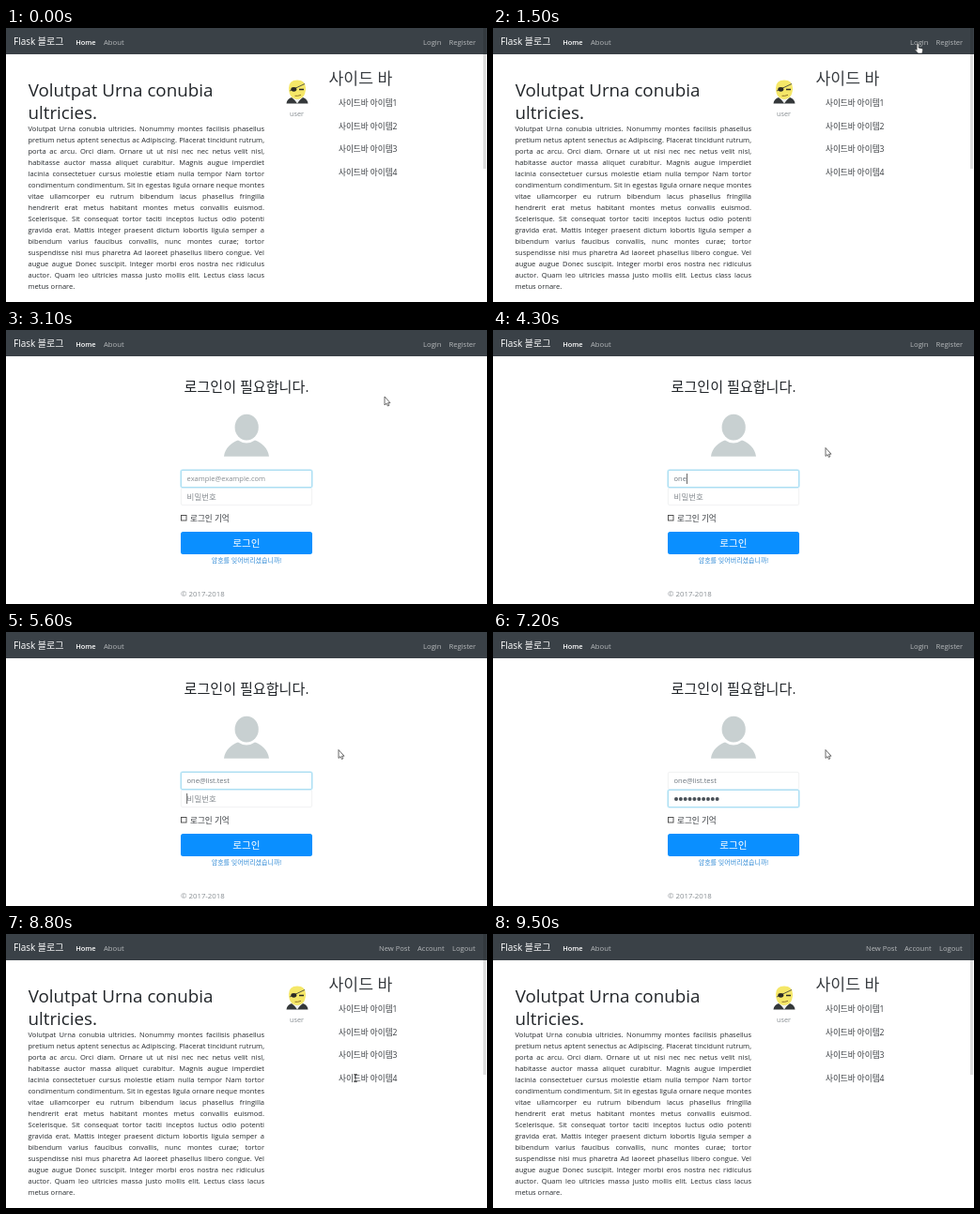
These frames come from a looping animation (512 by 292 pixels, 9.6 s). An HTML page:

```html
<!DOCTYPE html>
<html>
<head>
<meta charset="utf-8">
<title>Flask 블로그</title>
<style>
  html, body { margin: 0; width: 100%; height: 100%; overflow: hidden; background: #fff; }
  #stage { position: relative; width: 512px; height: 292px; overflow: hidden; }
  svg { position: absolute; left: 0; top: 0; }
  text, #post { font-family: "Open Sans", "Noto Sans CJK KR", "Noto Sans CJK", sans-serif; }
  text { white-space: pre; }
  #post { position: absolute; left: 23.5px; top: 101px; width: 251.5px;
          font-size: 7.55px; line-height: 12px; color: #25292d; }
  #post div { white-space: nowrap; text-align-last: justify; }
  #post div:last-child { text-align-last: left; }
</style>
</head>
<body>
<div id="stage">
  <svg width="512" height="292" viewBox="0 0 512 292">
    <rect width="512" height="28" fill="#3a4147"/>
    <g id="nav"></g>
    <g id="navGuest"></g>
    <g id="navUser"></g>

    <g id="home">
      <rect x="508" width="3" height="150" fill="#000" opacity=".13"/>
      <g id="avatar">
        <path d="M298.500 80.500Q299 75.500 304 74L310 79 316 74Q321 75.500 321.500 80.500Z" fill="#34383a"/>
        <path d="M305 73.500L310 80.500 315 73.500Z" fill="#eef0ee"/>
        <path d="M301 64Q301 55.500 310 55.500T319 64Q319 71 315.500 74Q310 78 304.500 74Q301 71 301 64Z" fill="#f5e768"/>
        <path d="M302 67L318 59.500" stroke="#34383a" stroke-width=".8"/>
        <ellipse cx="306.300" cy="65.300" rx="3" ry="2.400" fill="#2b2a25"/>
        <path d="M312 65.500H317" stroke="#2b2a25" stroke-width="1.500"/>
        <path d="M307.500 72.300Q310.500 72.800 314 71.300" fill="none" stroke="#7a5a1c" stroke-width=".8"/>
      </g>
    </g>

    <g id="login">
      <g fill="#c8d0d1">
        <ellipse cx="256.200" cy="103.700" rx="12.600" ry="13.900"/>
        <path d="M232 134.700C233 126 240 120 247 117.500Q256 123.500 265 117.500C272 120 279 126 280 134.700Z"/>
      </g>
      <g fill="#fff" stroke="#eceeef" stroke-width=".8">
        <rect x="186.400" y="149.400" width="139.200" height="18.200" rx="1.500"/>
        <rect x="186.400" y="168.400" width="139.200" height="18.200" rx="1.500"/>
      </g>
      <g id="mailGlow" fill="none">
        <rect x="186" y="149" width="140" height="19" rx="2" stroke="#d3f0fb" stroke-width="1.600"/>
        <rect x="186.400" y="149.400" width="139.200" height="18.200" rx="1.500" stroke="#9bd8f0" stroke-width=".8"/>
      </g>
      <g id="passGlow" fill="none">
        <rect x="186" y="168" width="140" height="19" rx="2" stroke="#d3f0fb" stroke-width="1.600"/>
        <rect x="186.400" y="168.400" width="139.200" height="18.200" rx="1.500" stroke="#9bd8f0" stroke-width=".8"/>
      </g>
      <rect x="186.500" y="197.500" width="5.500" height="5.500" fill="#fff" stroke="#444" stroke-width=".9"/>
      <rect x="186" y="215" width="140" height="24" rx="2.500" fill="#0a8fff"/>
      <g id="dots" fill="#495057"></g>
      <rect id="caret" width=".8" height="11" fill="#444"/>
    </g>
  </svg>
  <div id="post"></div>
  <svg width="512" height="292" viewBox="0 0 512 292">
    <g id="cursor">
      <path id="arrow" d="M0 0V9L2 7.200 3.400 10 4.800 9.400 3.500 6.700H6Z" fill="#fff" stroke="#444" stroke-width=".8"/>
      <path id="beam" d="M-.8-3H2.800M1-3V5M-.8 5H2.800" fill="none" stroke="#333" stroke-width=".8"/>
      <path id="hand" d="M-.8 7V1A.9.9 0 0 1 1 1V4.600L4.600 5.400Q5.600 5.700 5.400 7L4.800 10.500H.6L-2.600 7Q-2.400 5.600-.8 7Z" fill="#fff" stroke="#333" stroke-width=".5"/>
    </g>
  </svg>
</div>

<script>
const LOOP = 9600, STEP = 100;
const LOGIN_AT = 2200, TAB_AT = 5600, SUBMIT_AT = 7300;
const MAIL = "one@list.test", PASS_LENGTH = 10;
const LEFT = 192.6;

const el = id => document.getElementById(id);
const clamp = (v, lo, hi) => Math.min(hi, Math.max(lo, v));
const show = (id, on) => { el(id).style.display = on ? "" : "none"; };

function add(parent, tag, attrs) {
  const node = document.createElementNS("http://www.w3.org/2000/svg", tag);
  for (const key in attrs) node.setAttribute(key, attrs[key]);
  return el(parent).appendChild(node);
}

function label(parent, text, x, y, size, fill, weight = 400) {
  const node = add(parent, "text", { x, y, "font-size": size, "font-weight": weight, fill });
  node.textContent = text;
  return node;
}

const MUTED = "#b6b9bb", DARK = "#212529", SOFT = "#383c40", GRAY = "#868c91";

label("nav", "Flask 블로그", 8, 18, 10, "#fff");
label("nav", "Home", 74.2, 17.5, 7.4, "#fff", 600);
label("nav", "About", 104, 17.5, 7.7, MUTED);
label("navGuest", "Login", 444, 17.5, 7.7, MUTED);
label("navGuest", "Register", 471.5, 17.5, 7.6, MUTED);
label("navUser", "New Post", 397, 17.5, 7.6, MUTED);
label("navUser", "Account", 438, 17.5, 7.6, MUTED);
label("navUser", "Logout", 475, 17.5, 7.6, MUTED);

label("home", "Volutpat Urna conubia", 23.7, 73, 18.8, DARK);
label("home", "ultricies.", 23.5, 97, 18.8, DARK);
label("home", "user", 302, 94, 7.3, GRAY);
label("home", "사이드 바", 343.5, 60, 17.2, SOFT);
for (let i = 0; i < 4; i++)
  label("home", "사이드바 아이템" + (i + 1), 354, 83.2 + 24.5 * i, 8.6, SOFT, 500);

label("login", "로그인이 필요합니다.", 189.5, 65.6, 15.1, DARK);
const mailHint = label("login", "example@example.com", LEFT, 161.4, 7.5, GRAY);
const mailText = label("login", "", LEFT, 161.4, 7.5, "#6c757d");
const passHint = label("login", "비밀번호", LEFT, 180.8, 8.5, GRAY);
label("login", "로그인 기억", 196, 204, 8.6, SOFT, 500);
label("login", "로그인", 241.3, 231, 10.6, "#fff");
label("login", "암호를 잊어버리셨습니까!", 218.7, 248, 7, "#2f8ad6");
label("login", "© 2017-2018", 186, 284, 7.8, GRAY);

const dots = [];
for (let i = 0; i < PASS_LENGTH; i++)
  dots.push(add("dots", "circle", { cx: 195 + 4.85 * i, cy: 178, r: 2 }));

const POST = `Volutpat Urna conubia ultricies. Nonummy montes facilisis phasellus
pretium netus aptent senectus ac Adipiscing. Placerat tincidunt rutrum,
porta ac arcu. Orci diam. Ornare ut ut nisi nec nec netus velit nisl,
habitasse auctor massa aliquet curabitur. Magnis augue imperdiet
lacinia consectetuer cursus molestie etiam nulla tempor Nam tortor
condimentum condimentum. Sit in egestas ligula ornare neque montes
vitae ullamcorper eu rutrum bibendum lacus phasellus fringilla
hendrerit erat metus habitant montes metus convallis euismod.
Scelerisque. Sit consequat tortor taciti inceptos luctus odio potenti
gravida erat. Mattis integer praesent dictum lobortis ligula semper a
bibendum varius faucibus convallis, nunc montes curae; tortor
suspendisse nisi mus pharetra Ad laoreet phasellus libero congue. Vel
augue augue Donec suscipit. Integer morbi eros nostra nec ridiculus
auctor. Quam leo ultricies massa justo mollis elit. Lectus class lacus
metus ornare.`;
for (const line of POST.split("\n")) {
  const row = document.createElement("div");
  row.textContent = line;
  el("post").appendChild(row);
}

// Pointer stops: time, x, y
const PATH = [
  [700, 330, 215], [1000, 366, 150], [1500, 452, 16.5], [2700, 452, 16.5],
  [3500, 354, 125.5], [8600, 354, 125.5], [9300, 440, 262]
];

function pointerAt(t) {
  const i = PATH.findIndex(p => p[0] > t);
  if (i < 1) return null;
  const [t0, x0, y0] = PATH[i - 1], [t1, x1, y1] = PATH[i];
  const k = (t - t0) / (t1 - t0), e = k * k * (3 - 2 * k);
  return [x0 + (x1 - x0) * e, y0 + (y1 - y0) * e];
}

function drawPointer(t, onLogin) {
  const p = pointerAt(t);
  show("cursor", p);
  if (!p) return;
  const [x, y] = p;
  const hand = y < 22 && x > 440;
  const beam = !onLogin && x > 345 && x < 420 && y > 70 && y < 160;
  show("hand", hand);
  show("beam", beam);
  show("arrow", !hand && !beam);
  el("cursor").setAttribute("transform", `translate(${x} ${y})`);
}

function drawForm(t) {
  const typed = clamp((t - 4000) / STEP, 0, MAIL.length);
  const secret = clamp((t - 6000) / STEP, 0, PASS_LENGTH);
  const inPass = t >= TAB_AT;
  mailText.textContent = MAIL.slice(0, typed);
  mailHint.style.display = typed ? "none" : "";
  passHint.style.display = secret ? "none" : "";
  dots.forEach((dot, i) => { dot.style.display = i < secret ? "" : "none"; });

  const focus = clamp((t - LOGIN_AT) / 150, 0, 1);
  const moved = clamp((t - TAB_AT) / 150, 0, 1);
  el("mailGlow").style.opacity = focus - moved;
  el("passGlow").style.opacity = moved;

  const blink = t >= 4000 || Math.floor((t - LOGIN_AT) / 500) % 2 === 0;
  show("caret", blink && t < 7200);
  const mailEnd = typed ? mailText.getComputedTextLength() + .4 : 0;
  const x = LEFT + (inPass ? secret * 4.85 : mailEnd);
  el("caret").setAttribute("x", x - .3);
  el("caret").setAttribute("y", inPass ? 172 : 153);
}

function draw() {
  const t = Math.floor(performance.now() % LOOP / STEP) * STEP;
  const onLogin = t >= LOGIN_AT && t < SUBMIT_AT;
  show("login", onLogin);
  show("home", !onLogin);
  show("post", !onLogin);
  show("navGuest", t < SUBMIT_AT);
  show("navUser", t >= SUBMIT_AT);
  if (onLogin) drawForm(t);
  drawPointer(t, onLogin);
  requestAnimationFrame(draw);
}
draw();
</script>
</body>
</html>
```
